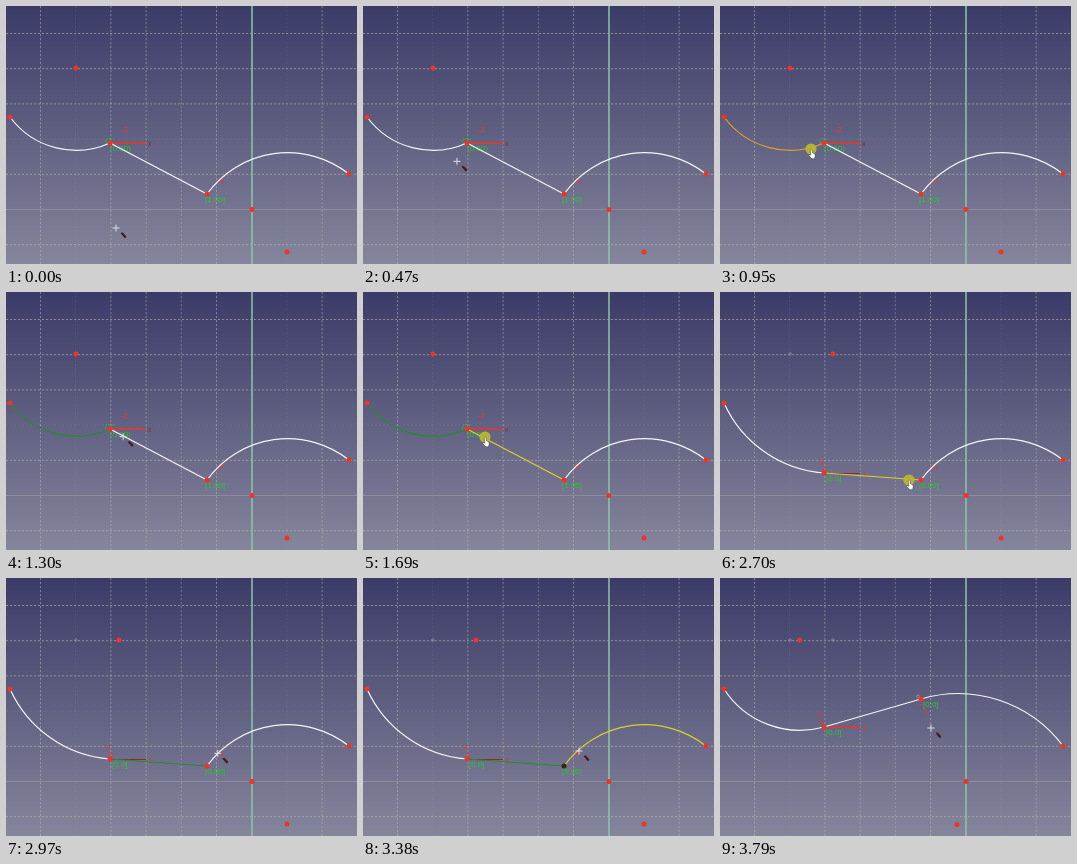
Animation of 351 by 258 pixels, one loop 3860 ms. Source, as an HTML page:

```html
<!DOCTYPE html>
<html lang="en">
<head>
<meta charset="utf-8">
<title>Tangent sketch</title>
<style>
html, body { margin: 0; width: 100%; height: 100%; overflow: hidden; background: #3b3b68; }
svg { display: block; width: 100vw; height: 100vh; }
text { font-family: "Liberation Sans", Arial, sans-serif; font-size: 8px; }
.curve { fill: none; stroke-width: 1.2; }
</style>
</head>
<body>
<svg id="stage" viewBox="0 0 351 258" preserveAspectRatio="none">
  <defs>
    <linearGradient id="sky" x1="0" y1="0" x2="0" y2="1">
      <stop offset="0" stop-color="#3b3b68"/>
      <stop offset="1" stop-color="#85859c"/>
    </linearGradient>
  </defs>
  <rect width="351" height="258" fill="url(#sky)"/>
  <g id="grid"></g>
  <g id="axes">
    <path d="M0 203.5H351" stroke="#92929f" stroke-width=".8"/>
    <path d="M246 0V258" stroke="#8cc7a5" stroke-width="1.5"/>
  </g>
  <g id="ghosts" fill="none" stroke="#8d8d9c" stroke-width=".8"></g>
  <g id="notes"></g>
  <path id="arcA" class="curve"/>
  <path id="line" class="curve"/>
  <path id="arcB" class="curve"/>
  <g id="points"></g>
  <g id="cursor">
    <circle id="press" r="5.6" fill="#bcb92c" opacity=".92"/>
    <g id="hand">
      <path d="M-.8 .5q.8-1.3 1.7 0l.5 3.3 2.2.8.7 2.2-.8 3H.8L-2.2 6.5q-.2-1.5 1.2-.8l.8.6z" fill="#fff" stroke="#343434" stroke-width=".5"/>
    </g>
    <g id="cross">
      <path d="M-3.5 0H3.5M0-3.5V3.5" stroke="#dedee6" stroke-width="1"/>
      <path d="M4.5 5l2.3-.7 3.7 4.2-1.7 1.8z" fill="#5a2020"/>
      <path d="M5.5 5.5l4 4" stroke="#251820" stroke-width="1"/>
    </g>
  </g>
</svg>
<script>
const LOOP = 3860;
const RED = '#ee3426', DARK = '#9c2432', GREEN = '#27c52f';
const WHITE = '#f4f4f6', HOVER = '#dfa21e', YELLOW = '#d9d02c', PICKED = '#208f2a';
const $ = id => document.getElementById(id);

function add(parent, tag, attrs, text) {
  const el = document.createElementNS('http://www.w3.org/2000/svg', tag);
  for (const k in attrs) el.setAttribute(k, attrs[k]);
  if (text) el.textContent = text;
  parent.appendChild(el);
  return el;
}
const show = (el, on) => el.setAttribute('display', on ? 'inline' : 'none');
const within = (t, a, b) => t >= a && t < b;

// Grid: some lines are nearly lost between pixels.
const grid = $('grid');
function rule(d, opacity) {
  add(grid, 'path', { d, stroke: '#b9b9ad', 'stroke-width': .8, 'stroke-dasharray': '2.2 1.8', opacity });
}
for (let i = 0; i < 9; i++) {
  if (i === 6) continue;
  const x = 34.5 + 35.2 * i;
  rule(`M${x} 0V258`, i === 1 || i === 7 ? .1 : i === 4 ? .5 : .65);
}
for (let i = 0; i < 7; i++) {
  if (i === 5) continue;
  rule(`M0 ${27.5 + 35.2 * i}H351`, i === 3 ? .1 : .75);
}

const START = [4, 111], END = [343, 168], FIXED = [246, 203.5];
const poses = [
  { a: [70, 62], p: [104, 137], q: [201, 188], b: [281, 246] },
  { a: [113, 62], p: [104, 181], q: [201, 188], b: [281, 246] },
  { a: [79.5, 62], p: [104, 149], q: [201, 121], b: [237, 246.5] }
];

function arc(from, to, c, sweep) {
  const r = (Math.hypot(from[0] - c[0], from[1] - c[1]) + Math.hypot(to[0] - c[0], to[1] - c[1])) / 2;
  return `M${from}A${r} ${r} 0 0 ${sweep} ${to}`;
}

// Constraint marks for each pose.
const groups = poses.map(() => add($('notes'), 'g', {}));
function note(pose, x, y, text, fill = GREEN, size = 8) {
  add(groups[pose], 'text', { x, y, fill, style: `font-size:${size}px` }, text);
}
function direction(pose, y, color, width) {
  add(groups[pose], 'path', { d: `M104 ${y}H140`, stroke: color, 'stroke-width': width });
}
direction(0, 137, RED, 1.5);
note(0, 99, 136.5, '(2"', GREEN, 7);
note(0, 104, 145, '(0.00)');
note(0, 113, 126, '–2', RED);
note(0, 142, 140, 'x', DARK, 7);
note(0, 199, 195.5, '[1.00]');
note(0, 212, 177, 'H', RED);

direction(1, 181.5, DARK, 1);
note(1, 100, 172, 'V', RED, 7);
note(1, 103, 178.5, '5', RED, 7);
note(1, 106, 189, '[0.0]');
note(1, 142.5, 185, '1', RED);
note(1, 199, 195.5, '[0.00]');
note(1, 212, 178, 'H', RED, 7);

direction(2, 149, RED, 1.6);
note(2, 97, 139, 'V', RED, 7);
note(2, 100, 146, '5', RED, 7);
note(2, 106, 157, '[0.0]');
note(2, 143, 152, '1', RED);
note(2, 203, 129, '[0.0]');
note(2, 199, 127, '2', RED, 7);
note(2, 204, 135.5, '5', RED, 7);
add(groups[2], 'circle', { cx: 198, cy: 118.5, r: 1.5, fill: 'none', stroke: '#a5a5ac', 'stroke-width': .7 });

const ghosts = [70, 113].map(x => add($('ghosts'), 'circle', { cx: x, cy: 62, r: 1.3 }));
const dots = Array.from({ length: 7 }, () => add($('points'), 'circle', { r: 2.5 }));

// Cursor moves: first step time, last step time, steps, destination.
const moves = [
  [120, 610, 8, 91, 143],
  [1160, 1360, 4, 122, 145],
  [1830, 1970, 3, 243, 166],
  [2030, 2100, 2, 206, 178],
  [2170, 2440, 4, 189, 188],
  [2830, 3040, 4, 216, 173],
  [3600, 3790, 4, 211, 150]
];

function cursorAt(t) {
  let x = 110, y = 222;
  for (const [from, to, steps, tx, ty] of moves) {
    if (t < from) break;
    const n = Math.floor((t - from) / (to - from) * (steps - 1) + 1e-6) + 1;
    const u = Math.min(1, n / steps);
    const k = u * u * (3 - 2 * u);
    x += (tx - x) * k;
    y += (ty - y) * k;
  }
  return [x, y];
}

function paint(id, d, color) {
  $(id).setAttribute('d', d);
  $(id).setAttribute('stroke', color);
}

function draw(t) {
  const n = t < 1760 ? 0 : t < 3440 ? 1 : 2;
  const { a, p, q, b } = poses[n];

  const colorA = within(t, 680, 1020) ? HOVER : within(t, 1020, 1760) ? PICKED : WHITE;
  const colorL = within(t, 1360, 1630) || within(t, 2440, 2700) ? HOVER
    : within(t, 1630, 1760) || within(t, 2700, 2770) ? YELLOW
    : within(t, 2770, 3440) ? PICKED : WHITE;
  const colorB = within(t, 2170, 2350) || within(t, 3040, 3310) ? HOVER
    : within(t, 3310, 3440) ? YELLOW : WHITE;

  paint('arcA', arc(START, p, a, 0), colorA);
  paint('line', `M${p}L${q}`, colorL);
  paint('arcB', arc(q, END, b, 1), colorB);

  groups.forEach((g, i) => show(g, i === n));
  show(ghosts[0], n > 0);
  show(ghosts[1], n === 2);
  [START, a, p, q, END, b, FIXED].forEach(([x, y], i) => {
    dots[i].setAttribute('cx', x);
    dots[i].setAttribute('cy', y);
    dots[i].setAttribute('fill', i === 3 && within(t, 3380, 3440) ? '#3b2414' : RED);
  });

  const hand = within(t, 680, 1160) || within(t, 1360, 1830) || within(t, 2440, 2830) || within(t, 3040, 3380);
  const press = within(t, 950, 1020) || within(t, 1630, 1760) || within(t, 2700, 2770) || within(t, 3310, 3380);
  $('cursor').setAttribute('transform', `translate(${cursorAt(t)})`);
  show($('hand'), hand);
  show($('cross'), !hand);
  show($('press'), press);
}

const began = performance.now();
function tick() {
  draw((performance.now() - began) % LOOP);
  requestAnimationFrame(tick);
}
tick();
</script>
</body>
</html>
```
